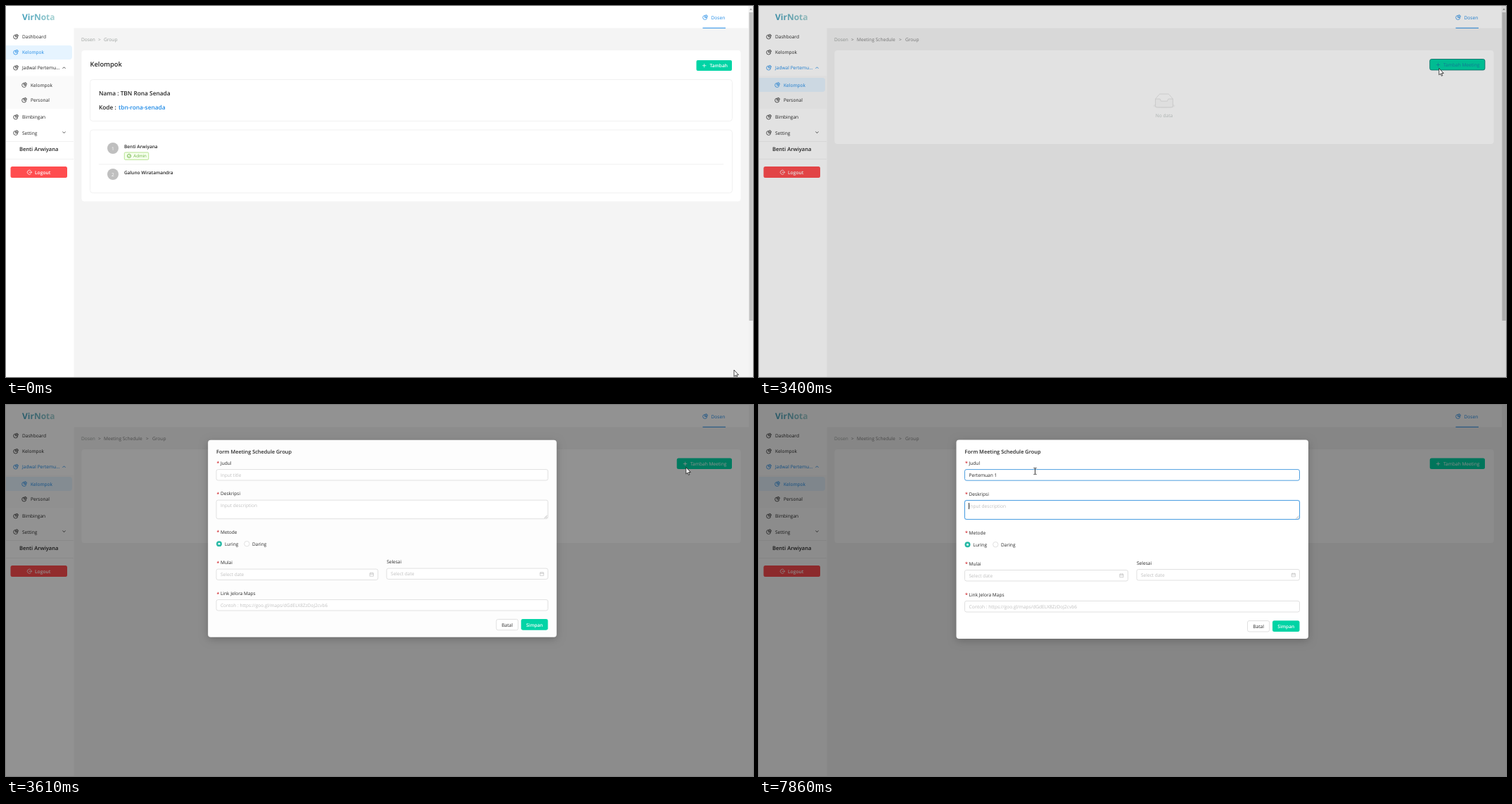
Animation of 1062x527 px, one loop 8000 ms. Source, as an HTML page with a canvas:

```html
<!DOCTYPE html>
<html lang="id">
<head>
<meta charset="utf-8">
<title>Meeting schedule form</title>
<style>
html, body { margin: 0; width: 100%; height: 100%; overflow: hidden; background: #f4f4f4; }
canvas { display: block; }
</style>
</head>
<body>
<canvas id="stage" width="1062" height="527"></canvas>
<script>
const ctx = document.getElementById('stage').getContext('2d');
const LOOP = 8000;
const DARK = '#262626', BLUE = '#1f8ae6', MINT = '#00d4a5', HINT = '#bfbfbf', LINE = '#d9d9d9', SELECTED = '#e6f4ff';
const FONT = '"Open Sans", "Noto Sans", sans-serif';

const ramp = (t, a, b) => Math.min(1, Math.max(0, (t - a) / (b - a)));
const smooth = p => p * p * (3 - 2 * p);
const lerp = (a, b, p) => a + (b - a) * p;
const blend = (a, b, p) => {
  const part = (c, i) => parseInt(c.slice(1 + 2 * i, 3 + 2 * i), 16);
  return `rgb(${[0, 1, 2].map(i => Math.round(lerp(part(a, i), part(b, i), p)))})`;
};

// cubic-bezier(.08, .82, .17, 1)
function easeOutCirc(x) {
  let lo = 0, hi = 1;
  for (let i = 0; i < 20; i++) {
    const u = (lo + hi) / 2, v = 1 - u;
    if (3 * v * v * u * .08 + 3 * v * u * u * .17 + u ** 3 < x) lo = u; else hi = u;
  }
  return 1 - (1 - lo) ** 3 - 3 * (1 - lo) ** 2 * lo * .18;
}

function text(s, x, y, color = DARK, size = 6.6, weight = 400, align = 'left') {
  ctx.font = `${weight} ${size}px ${FONT}`;
  ctx.textRendering = 'geometricPrecision';
  ctx.textAlign = align;
  ctx.fillStyle = color;
  ctx.fillText(s, x, y);
}

function box(x, y, x2, y2, fill, r = 0, stroke) {
  ctx.beginPath();
  ctx.roundRect(x, y, x2 - x, y2 - y, r);
  if (fill) { ctx.fillStyle = fill; ctx.fill(); }
  if (stroke) { ctx.strokeStyle = stroke; ctx.lineWidth = .8; ctx.stroke(); }
}

function disc(x, y, r, fill, stroke) {
  box(x - r, y - r, x + r, y + r, fill, r, stroke);
}

function shape(d, x, y, stroke, width = .8, fill, scale = 1) {
  ctx.save();
  ctx.translate(x, y);
  ctx.scale(scale, scale);
  const path = new Path2D(d);
  if (fill) { ctx.fillStyle = fill; ctx.fill(path); }
  if (stroke) { ctx.strokeStyle = stroke; ctx.lineWidth = width; ctx.stroke(path); }
  ctx.restore();
}

const pie = (x, y, color) =>
  shape('M-.4-2.6A3 3 0 1 0 2.7.5H-.4ZM.9-3.4A2.8 2.8 0 0 1 3.5-.8H.9Z', x, y, color, .75);
const plus = (x, y, color) => shape('M-2.7 0H2.7M0-2.7V2.7', x, y, color, .7);
const chevron = (y, up, color) => shape(up ? 'M-2 1L0-1L2 1' : 'M-2-1L0 1L2-1', 82.5, y, color, .8);
const calendar = (x, y) => shape('M-2.6-2H2.6V2.5H-2.6ZM-2.6-.3H2.6M-1.2-2.9V-1.4M1.2-2.9V-1.4', x, y, '#b5b5b5', .6);

function sidebar(t) {
  const hover = ramp(t, 760, 900) - ramp(t, 1100, 1300);
  const sel = ramp(t, 1680, 1950);
  const parent = blend(DARK, BLUE, Math.max(hover, sel));
  const group = blend(BLUE, DARK, ramp(t, 1800, 2000));
  const child = blend(DARK, BLUE, sel);

  box(0, 0, 96.5, 527, '#fff');
  box(0, 99.5, 96.5, 146, '#fafafa');
  box(0, 56, 94, 76, blend(SELECTED, '#ffffff', ramp(t, 1800, 2000)), [0, 4, 4, 0]);
  if (t > 1180) box(0, 102, 94, 122, blend('#fafafa', SELECTED, ramp(t, 1180, 1350)), [0, 4, 4, 0]);

  const logo = ctx.createLinearGradient(23, 0, 70, 0);
  logo.addColorStop(0, '#429fba');
  logo.addColorStop(1, '#a9d3d3');
  text('VirNota', 23, 20.2, logo, 12, 700);

  const item = (label, x, y, color) => {
    pie(x, y, color);
    text(label, x + 9, y + 2.5, color);
  };
  item('Dashboard', 14, 43.5, DARK);
  item('Kelompok', 14, 65.6, group);
  item('Jadwal Pertemu...', 14, 87.6, parent);
  chevron(87.8, true, parent);
  item('Kelompok', 26, 112, child);
  item('Personal', 26, 133.6, DARK);
  item('Bimbingan', 14, 157.6, DARK);
  item('Setting', 14, 180, DARK);
  chevron(179.5, false, DARK);

  box(0, 192, 96, 192.7, '#ececec');
  box(0, 217, 96, 217.7, '#ececec');
  text('Benti Arwiyana', 46.7, 206, DARK, 7.6, 600, 'center');
  box(6.5, 228, 87, 244, '#ff4d4f', 2.5);
  shape('M2.2-2A3 3 0 1 0 2.2 2M-.8 0H3.4M2.2-1.2L3.4 0L2.2 1.2', 33.3, 236.2, '#fff', .75);
  text('Logout', 41, 238.7, '#fff', 6.7, 600);
}

function header() {
  box(96, 0, 1056, 31.5, '#fff');
  pie(994, 16, BLUE);
  text('Dosen', 1002.5, 18.5, BLUE);
  box(990.5, 30.7, 1023, 31.8, BLUE);
}

function groupPage() {
  text('Dosen', 107, 50.1, '#9a9f9c');
  text('>', 131, 50.1, '#9a9f9c');
  text('Group', 139, 50.1, '#9a9f9c');
  box(107.5, 63, 1044.5, 277.5, '#fff', 4);
  text('Kelompok', 119.5, 85.6, DARK, 9.3, 600);
  box(981.5, 77, 1032, 92, MINT, 2);
  plus(992.7, 84.7, '#fff');
  text('Tambah', 1000.5, 87.2, '#fff', 6.6, 600);

  box(119.5, 104.5, 1032.5, 163.5, null, 4, '#eee');
  text('Nama : TBN Rona Senada', 132, 127.4, DARK, 8.3, 600);
  text('Kode :', 132, 147.4, DARK, 8.3, 600);
  text('tbn-rona-senada', 160, 147.4, BLUE, 8.3, 600);

  box(119.5, 176, 1032.5, 265.5, null, 4, '#eee');
  box(132, 224.6, 1020, 225.3, '#ececec');
  [['Benti Arwiyana', 202], ['Galuno Wiratamandra', 239]].forEach(([name, y], i) => {
    disc(152, y, 8, '#bfbfbf');
    text(i + 1, 152, y + 2.6, '#fff', 6.6, 400, 'center');
    text(name, 168, y + .3, DARK, 6.5, 600);
  });
  box(168.3, 208, 202.7, 218.3, '#f6ffed', 1.5, '#a5dc78');
  disc(175, 213, 2.6, null, '#5fae35');
  shape('M-1.2 0L-.2 1L1.3-1', 175, 213, '#5fae35', .6);
  text('Admin', 181.3, 215.3, '#69b340', 6.1);
}

function meetingPage(t) {
  text('Dosen', 107, 50.1, '#9a9f9c');
  text('>', 131, 50.1, '#777');
  text('Meeting Schedule', 139, 50.1, '#808080');
  text('>', 199, 50.1, '#777');
  text('Group', 208, 50.1, '#808080');
  box(107.5, 63, 1044.5, 196, '#fff', 4);

  const hover = ramp(t, 3040, 3280) - ramp(t, 3400, 3600);
  const label = blend('#ffffff', '#1684a8', hover);
  box(953.7, 75.5, 1032, 91, MINT, 2.5, hover > 0 ? blend(MINT, '#08706c', hover) : null);
  plus(965.5, 83.5, label);
  text('Tambah Meeting', 973, 86.1, label, 6.6, hover > .5 ? 400 : 500);

  ctx.beginPath();
  ctx.ellipse(576, 141.8, 15.5, 3.5, 0, 0, 7);
  ctx.fillStyle = '#f5f5f5';
  ctx.fill();
  shape('M-23 13L-13 1.2Q-12 0-11 0H11Q12 0 13 1.2L23 13', 576, 125, LINE, 1.2, '#fff', .54);
  shape('M-23 13H-12Q-10 13-9.6 16T-7.4 18.8H7.4Q9.2 18.8 9.6 16T12 13H23V31Q23 35 20 35H-20Q-23 35-23 31Z',
    576, 125, LINE, 1.2, '#fafafa', .54);
  text('No data', 576, 157.5, '#c2c8c6', 6.6, 400, 'center');
}

function scrollbar() {
  box(1055.5, 0, 1062, 527, '#f1f1f1');
  box(1056.5, 9, 1061.7, 447, '#c1c1c1');
  shape('M-1.8 1L0-1L1.8 1Z', 1059, 4.5, null, 0, '#8a8a8a');
}

function progress(t) {
  if (t < 1640 || t > 2280) return;
  ctx.globalAlpha = 1 - ramp(t, 2080, 2280);
  const width = lerp(67 * ramp(t, 1640, 1740), 1056, smooth(ramp(t, 1880, 2080)));
  box(0, 0, width, 1.2, '#2299dd');
  const turn = (t - 1740) / 400 * 2 * Math.PI;
  ctx.beginPath();
  ctx.arc(1042.5, 12, 4.4, turn + Math.PI, turn + 1.85 * Math.PI);
  ctx.strokeStyle = '#2299dd';
  ctx.lineWidth = 1;
  ctx.stroke();
  ctx.globalAlpha = 1;
}

const TITLE = 'Pertemuan 1';
const KEYS = [5270, 5670, 5740, 5810, 5900, 5990, 6120, 6190, 6260, 6390, 6520];

function field(x, y, x2, y2, hint, focus = 0, ring = 0) {
  if (ring) box(x - .8, y - .8, x2 + .8, y2 + .8, `rgba(24,144,255,${.22 * ring})`, 3);
  box(x, y, x2, y2, '#fff', 2.5, blend(LINE, '#2488d8', focus));
  if (hint) text(hint, x + 6, y + 10.3, HINT);
}

function label(s, x, y, required = true) {
  if (required) text('*', x + .5, y + .7, '#d0272d', 7, 600);
  text(s, x + (required ? 6 : 0), y);
}

function form(t) {
  const typed = KEYS.filter(k => k <= t).length;
  const noted = ramp(t, 7580, 7800);

  ctx.save();
  ctx.shadowColor = 'rgba(0,0,0,.22)';
  ctx.shadowBlur = 12;
  ctx.shadowOffsetY = 3;
  box(280.5, 49.5, 781, 332, '#fff', 4);
  ctx.restore();

  text('Form Meeting Schedule Group', 292.5, 68.5, DARK, 7.4, 600);
  label('Judul', 292.5, 84.6);
  field(292.5, 91.6, 768.5, 107.2, typed ? '' : 'Input title',
    ramp(t, 4380, 4500), ramp(t, 4650, 4720) * (1 - noted));
  label('Deskripsi', 292.5, 128.6);
  field(292.5, 135.6, 768.5, 162.4, 'Input description', noted, noted);
  shape('M0-4L-4 0M0-1.8L-1.8 0', 767.5, 161.5, '#888', .6);

  label('Metode', 292.5, 183.6);
  disc(296.5, 198.2, 4, '#27b9a5');
  disc(296.5, 198.2, 1.5, '#fff');
  text('Luring', 304.5, 200.7);
  disc(336.3, 198.2, 3.7, '#fff', LINE);
  text('Daring', 344, 200.7);

  label('Mulai', 292.5, 227.6);
  field(292.5, 234.5, 524.5, 250, 'Select date');
  calendar(515.4, 242.2);
  label('Selesai', 537, 226.6, false);
  field(537, 233.5, 768.5, 249, 'Select date');
  calendar(759.8, 241.4);

  label('Link Jelora Maps', 292.5, 271.6);
  field(292.5, 278.4, 768.5, 294, 'Contoh : https://goo.gl/maps/dGdELX8ZzDoJ2cvb6');
  box(694.5, 306.5, 725.7, 322, '#fff', 2.5, LINE);
  text('Batal', 710, 316.9, DARK, 6.6, 400, 'center');
  box(730, 306.2, 768.5, 322, MINT, 2.5);
  text('Simpan', 749.2, 316.9, '#fff', 6.6, 600, 'center');

  text(TITLE.slice(0, typed), 298.5, 102);
  if (t >= 7580) {
    box(298.2, 139, 299, 148, '#000');
  } else if (t >= 4650) {
    const since = t - (typed ? KEYS[typed - 1] : 4650);
    const x = 298.5 + ctx.measureText(TITLE.slice(0, typed)).width;
    if (since % 1060 < 530) box(x, 95, x + .8, 104, '#000');
  }
}

function modal(t) {
  const e = easeOutCirc(ramp(t, 3404, 3704));
  ctx.fillStyle = `rgba(0,0,0,${.45 * ramp(t, 3325, 3625)})`;
  ctx.fillRect(0, 0, 1062, 527);
  if (t < 3404) return;
  const scale = lerp(.2, 1, e);
  ctx.save();
  ctx.globalAlpha = e;
  ctx.translate(967, 88);
  ctx.scale(scale, scale);
  ctx.translate(-967, -88);
  form(t);
  ctx.restore();
}

function capsNotice() {
  ctx.save();
  ctx.shadowColor = 'rgba(0,0,0,.38)';
  ctx.shadowBlur = 5;
  ctx.shadowOffsetX = ctx.shadowOffsetY = 10.5;
  box(486, 421.3, 575, 483.6, '#f2f2f2');
  ctx.restore();
  shape('M-10.5 7.5L-5-6.5L.5 7.5M-8.6 3H-1.4M0 4.5L4.6-6.5L10.3 7.5M2.2 3H8.6', 530.5, 441, '#111', 1.8);
  shape('M-9 10L9.5-8.5', 530.5, 441, '#f2f2f2', 4);
  shape('M-9 10L9.5-8.5', 530.5, 441, '#111', 1.7);
  text('Caps Lock Off', 530.5, 462.4, '#111', 7.5, 500, 'center');
}

// time, x, y
const TRAIL = [
  [0, 1035, 517], [70, 1035, 517], [830, 66, 93], [1040, 66, 93], [1300, 64.5, 117], [1880, 64.5, 117],
  [2500, 966, 97], [2700, 966, 97], [2770, 966, 92], [2970, 966, 92], [3040, 966.8, 88.5],
  [3820, 966.8, 88.5], [4450, 392.5, 94], [LOOP, 392.5, 94]
];

function cursor(t) {
  const i = TRAIL.findIndex(k => k[0] > t);
  const [t0, x0, y0] = TRAIL[i - 1], [t1, x1, y1] = TRAIL[i];
  const p = smooth(ramp(t, t0, t1)), x = lerp(x0, x1, p), y = lerp(y0, y1, p);
  if (x < 94) {
    shape('M-1 .8Q0-.6 1 .8V5Q2.2 4.2 2.8 5.3Q4 4.8 4.4 5.8Q5.6 5.6 5.6 7V9Q5.4 11 4.4 12.6H-1.2Q-2 10.6-3.6 8.2Q-3.8 6.6-2.2 7.2L-1 8.4Z',
      x, y, '#111', .8, '#fff');
  } else if (t > 3820 && x < 769 && y > 91.5) {
    shape('M-2-4.6H-.6L0-4L.6-4.6H2M0-4V4M-2 4.6H-.6L0 4L.6 4.6H2', x, y, '#222', .9);
  } else {
    shape('M0 0V9.4L2.1 7.5L3.6 10.8L5 10.2L3.6 7H6.5Z', x, y, '#111', .75, '#fff');
  }
}

function draw(now) {
  const t = now % LOOP;
  ctx.globalAlpha = 1;
  box(0, 0, 1062, 527, '#f4f4f4');
  header();
  sidebar(t);
  if (t < 1700) groupPage(); else meetingPage(t);
  if (t < 3404) scrollbar();
  progress(t);
  if (t > 3325) modal(t);
  if (t >= 5200 && t < 7380) capsNotice();
  cursor(t);
  requestAnimationFrame(draw);
}
requestAnimationFrame(draw);
</script>
</body>
</html>
```
